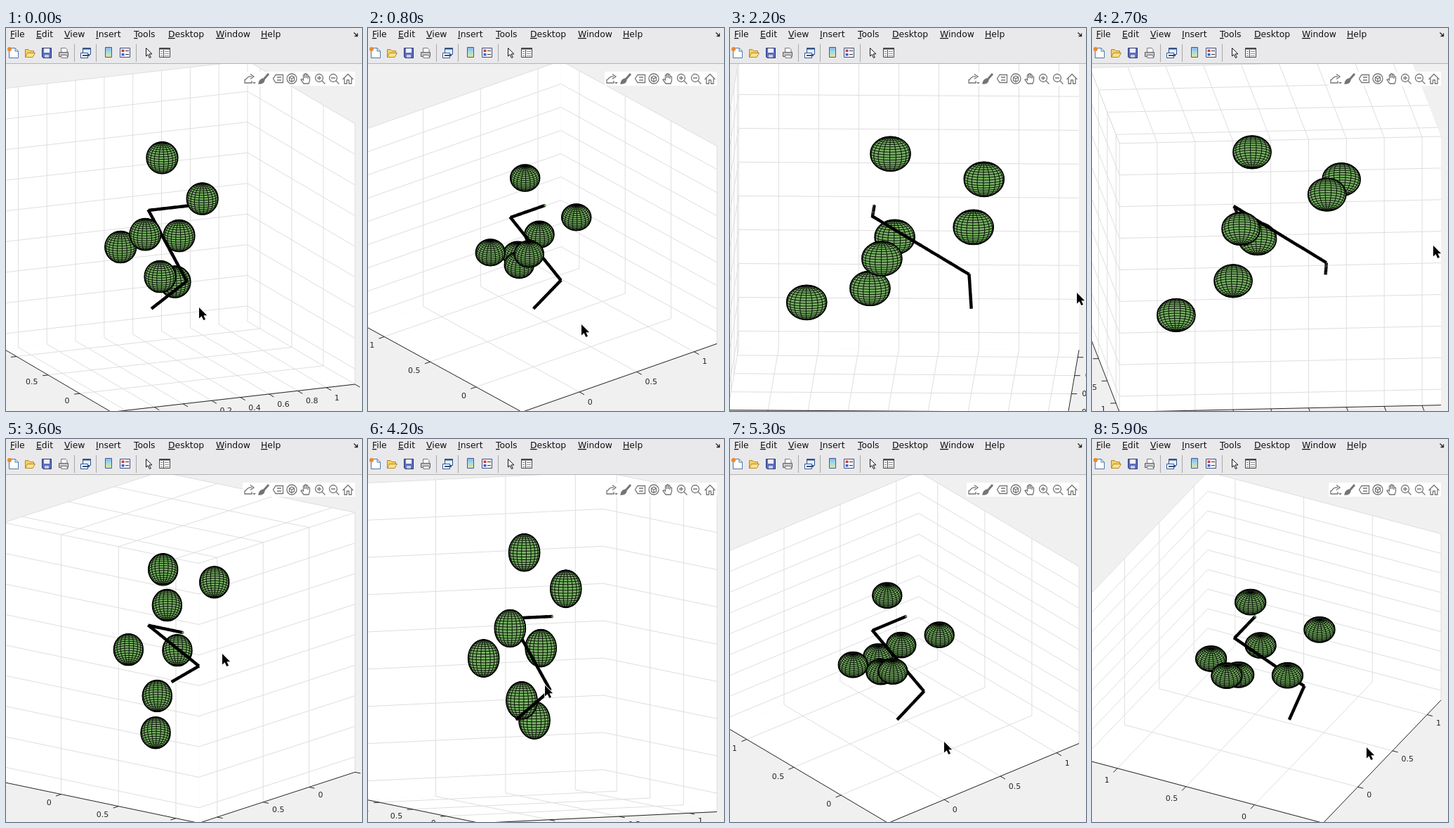
An HTML page with a canvas that plays this animation: 507 px wide and 544 px high, repeating every 6000 ms.

```html
<!DOCTYPE html>
<html lang="en">
<head>
<meta charset="utf-8">
<title>Rotating 3D plot</title>
<style>
html, body { margin: 0; width: 100%; height: 100%; overflow: hidden; background: #f0f0f0; }
canvas, svg { position: absolute; left: 0; top: 0; width: 507px; height: 544px; display: block; }
svg text { font: 12.4px "DejaVu Sans", sans-serif; fill: #111; }
svg tspan { text-decoration: underline; }
</style>
</head>
<body>
<canvas id="plot" width="507" height="544"></canvas>
<svg viewBox="0 0 507 544">
  <rect width="507" height="51" fill="#e9e9eb"/>
  <path d="M0 50.5H507" stroke="#b4b4b4"/>
  <g>
    <text x="6" y="13"><tspan>F</tspan>ile</text><text x="43" y="13"><tspan>E</tspan>dit</text>
    <text x="83" y="13"><tspan>V</tspan>iew</text><text x="128" y="13"><tspan>I</tspan>nsert</text>
    <text x="182" y="13"><tspan>T</tspan>ools</text><text x="231" y="13"><tspan>D</tspan>esktop</text>
    <text x="299" y="13"><tspan>W</tspan>indow</text><text x="363" y="13"><tspan>H</tspan>elp</text>
  </g>
  <path d="M495.500 6.500L500 11M500.500 7.500V11.500H496.500" fill="none" stroke="#222" stroke-width="1.300"/>
  <path d="M97.500 23V48M128.500 23V48M185.500 23V48" stroke="#a8a8a8"/>
  <g stroke-width="1">
    <path d="M4.500 28.500H13L17.500 33V42.500H4.500Z" fill="#fff" stroke="#4a76a8"/>
    <path d="M13 28.500V33H17.500" fill="none" stroke="#4a76a8"/>
    <circle cx="5" cy="30" r="3" fill="#e88a32"/>
    <path d="M27.500 41.500V30.500H32L34 32.500H39.500V35" fill="#f4cf62" stroke="#b8862a"/>
    <path d="M27.500 41.500L30.500 35.500H41.500L38 41.500Z" fill="#fbe28a" stroke="#b8862a"/>
    <path d="M51.500 28.500H64.500V42.500H53L51.500 41Z" fill="#5c6fc0" stroke="#2c3670"/>
    <path d="M54 29H62V35H54Z" fill="#eef0fa"/><path d="M55 38H61V42H55Z" fill="#c8cce0"/>
    <path d="M78.500 34V28.500H85L87 30.500V34" fill="#fff" stroke="#777"/>
    <path d="M75.500 34.500H88.500V40.500H75.500Z" fill="#c4c4c8" stroke="#5c5c60"/>
    <path d="M78.500 38.500H86L88 42.500H79Z" fill="#fff" stroke="#777"/>
    <path d="M109.500 28.500H120.500V37.500H109.500Z" fill="#e6eefa" stroke="#2f528c"/>
    <path d="M109 29.500H121" stroke="#2f528c" stroke-width="2"/>
    <path d="M106.500 35.500H116.500V42.500H106.500Z" fill="#fff" stroke="#2f528c"/>
    <path d="M109 39H119" stroke="#2f528c" stroke-width="2"/>
    <path d="M141.500 27.500H150.500V41.500H141.500Z" fill="url(#bar)" stroke="#3d5c9c"/>
    <path d="M162.500 28.500H176.500V41.500H162.500Z" fill="#fff" stroke="#3a4a80"/>
    <path d="M164.500 30.500H168.500V34H164.500Z" fill="#d04038"/><path d="M164.500 36H168.500V39.500H164.500Z" fill="#3f60cc"/>
    <path d="M170 32.500H175M170 37.500H175" stroke="#333"/>
    <path d="M199.500 28.500V40L202.200 37.600L204.500 42.500L206.300 41.700L204 36.900H208Z" fill="#fff" stroke="#111"/>
    <path d="M218.500 28.500H233.500V41.500H218.500Z" fill="#fff" stroke="#444"/>
    <path d="M218 29.500H234" stroke="#444" stroke-width="2"/>
    <path d="M224.500 31V41" stroke="#444"/>
    <path d="M220 33.500H223M220 36.500H223M220 39.500H223M226 33.500H232M226 36.500H232M226 39.500H232" stroke="#888"/>
  </g>
  <defs>
    <linearGradient id="bar" x2="0" y2="1">
      <stop stop-color="#8fb0f0"/><stop offset=".5" stop-color="#9fe0e0"/><stop offset="1" stop-color="#f2e08a"/>
    </linearGradient>
  </defs>
  <rect x="337" y="62" width="160" height="20" fill="#fff"/>
  <g fill="none" stroke="#757575" stroke-width="1.300">
    <path d="M340 73V78H350V75M341 74Q344 68 350 69M348 65.500L353 69L348 72.500"/>
    <path d="M351 77H356L353.500 79.500Z" fill="#757575" stroke="none"/>
    <path d="M374 65L367 73" stroke-width="3"/><path d="M366 72Q361 73 360 79Q367 79 368 74Z" fill="#757575"/>
    <path d="M384 66.500H394.500V77.500H384L380.500 72ZM386 70H392M386 74H392"/>
    <circle cx="407" cy="72" r="7"/><path d="M403.500 70L407 68L410.500 70V74.500L407 76.500L403.500 74.500ZM403.500 70L407 72L410.500 70M407 72V76.500"/>
    <path d="M424 79L420 73.500Q421 71.500 423.500 74V67Q424.500 65.500 425.500 67V71V65.500Q426.700 64 427.800 65.500V71V66Q429 65 430 66.500V72V69Q431.500 68 432.500 69.500V75L431 79Z"/>
    <circle cx="446" cy="71" r="5.500"/><path d="M443 71H449M446 68V74M450 75L454.500 79.500"/>
    <circle cx="466" cy="71" r="5.500"/><path d="M463 71H469M470 75L474.500 79.500"/>
    <path d="M479.500 73L487 65.500L494.500 73M482 71.500V79H485.500V74H488.500V79H492V71.500"/>
  </g>
  <path id="cursor" d="M0 0V15.500L3.600 12.200L6.300 18L9 16.800L6.400 11.200H11.200Z" fill="#000" stroke="#fff" stroke-width="1.600" paint-order="stroke"/>
</svg>
<script>
const ctx = document.getElementById("plot").getContext("2d");
const cursor = document.getElementById("cursor");
const LOOP = 6000, STEP = 100;
const MIN = -0.5, MAX = 1.2, SPAN = MAX - MIN, MID = (MIN + MAX) / 2;
const BOX = { cx: 247, cy: 296, w: 500, h: 499 };

// time, azimuth, elevation, pointer x, pointer y
const KEYS = [
  [0, -23.8, 14.8, 275, 397],
  [200, -23.8, 14.8, 262, 384],
  [300, -23.8, 14.8, 262, 384],
  [900, -42, 31.5, 314, 427],
  [1400, -60.8, 40.6, 379, 444],
  [1800, -77, 29, 446, 419],
  [2200, -88.2, 12.2, 494, 376],
  [2700, -84.75, -15.8, 486, 309],
  [3150, -63, -21, 402, 285],
  [3600, -38.7, -14.1, 308, 305],
  [4150, -26.5, 3, 256, 346],
  [4700, -20, 22.25, 233, 394],
  [5300, -40, 35, 305, 430],
  [5900, -63.2, 39.6, 391, 438]
];
const BALLS = [
  [.257, .412, .858], [.332, -.053, .695], [-.048, -.012, .493], [.367, .394, .342],
  [-.018, .446, .297], [.288, .515, .055], [.534, .839, -.084]
];
const ARM = [[0, 0, 0], [.255, .019, .148], [.2, .5, .5], [.5, .5, .5]];
const RADIUS = .1, PIECES = 16;

function slope(i, c) {
  const a = KEYS[Math.max(i - 1, 0)], b = KEYS[Math.min(i + 1, KEYS.length - 1)];
  return (b[c] - a[c]) / (b[0] - a[0]);
}

function sample(t) {
  let i = 0;
  while (i < KEYS.length - 2 && t >= KEYS[i + 1][0]) i++;
  const a = KEYS[i], b = KEYS[i + 1], h = b[0] - a[0], s = (t - a[0]) / h;
  const s2 = s * s, s3 = s2 * s;
  return [1, 2, 3, 4].map(c =>
    a[c] * (2 * s3 - 3 * s2 + 1) + b[c] * (3 * s2 - 2 * s3) +
    h * (slope(i, c) * (s3 - 2 * s2 + s) + slope(i + 1, c) * (s3 - s2)));
}

// Orthographic camera whose projected cube always fills the axes box
function makeView(az, el) {
  const rad = Math.PI / 180;
  const ca = Math.cos(az * rad), sa = Math.sin(az * rad);
  const ce = Math.cos(el * rad), se = Math.sin(el * rad);
  const wide = Math.abs(ca) + Math.abs(sa);
  const kx = BOX.w / wide, ky = BOX.h / (Math.abs(se) * wide + ce);
  const turn = (u, v, w) => [
    kx * (ca * u + sa * v),
    -ky * (se * (ca * v - sa * u) + ce * w),
    ce * (sa * u - ca * v) + se * w
  ];
  const project = ([x, y, z]) => {
    const p = turn((x - MID) / SPAN, (y - MID) / SPAN, (z - MID) / SPAN);
    return [BOX.cx + p[0], BOX.cy + p[1], p[2]];
  };
  return { ca, sa, se, kx, ky, turn, project };
}

function ticks(step) {
  const out = [];
  for (let i = Math.ceil(MIN / step - 1e-6); i * step <= MAX + 1e-6; i++) out.push(i * step);
  return out;
}

function trace(view, points) {
  points.forEach((p, i) => {
    const [x, y] = view.project(p);
    i ? ctx.lineTo(x, y) : ctx.moveTo(x, y);
  });
}

function drawWalls(view, far, steps) {
  const zBack = view.se > 0 ? MIN : MAX;
  const [fx, fy] = far;
  const faces = [
    [[fx, MIN, MIN], [fx, MAX, MIN], [fx, MAX, MAX], [fx, MIN, MAX]],
    [[MIN, fy, MIN], [MAX, fy, MIN], [MAX, fy, MAX], [MIN, fy, MAX]],
    [[MIN, MIN, zBack], [MAX, MIN, zBack], [MAX, MAX, zBack], [MIN, MAX, zBack]]
  ];
  ctx.fillStyle = "#fff";
  for (const f of faces) {
    ctx.beginPath();
    trace(view, f);
    ctx.fill();
  }
  ctx.strokeStyle = "#dedede";
  ctx.lineWidth = 1;
  ctx.beginPath();
  for (const x of ticks(steps[0])) {
    trace(view, [[x, fy, MIN], [x, fy, MAX]]);
    trace(view, [[x, MIN, zBack], [x, MAX, zBack]]);
  }
  for (const y of ticks(steps[1])) {
    trace(view, [[fx, y, MIN], [fx, y, MAX]]);
    trace(view, [[MIN, y, zBack], [MAX, y, zBack]]);
  }
  for (const z of ticks(.2)) {
    trace(view, [[fx, MIN, z], [fx, MAX, z]]);
    trace(view, [[MIN, fy, z], [MAX, fy, z]]);
  }
  ctx.stroke();
}

function drawRuler(view, axis, fixed, step) {
  const at = (v, f = fixed) => view.project(axis ? [f, v, MIN] : [v, f, MIN]);
  const a = at(MIN), b = at(MAX), inner = at(MIN, MIN + MAX - fixed);
  const dx = a[0] - inner[0], dy = a[1] - inner[1], len = Math.hypot(dx, dy) || 1;
  const ux = dx / len, uy = dy / len, side = Math.sign(ux);
  const steep = Math.abs(b[1] - a[1]) > 4 * Math.abs(b[0] - a[0]);
  const gap = side > 0 ? 3 : 4.5;
  ctx.strokeStyle = ctx.fillStyle = "#262626";
  ctx.lineWidth = 1;
  ctx.textAlign = side > 0 ? "left" : "right";
  ctx.beginPath();
  ctx.moveTo(a[0], a[1]);
  ctx.lineTo(b[0], b[1]);
  for (const v of ticks(step)) {
    const [x, y] = at(v);
    ctx.moveTo(x, y);
    ctx.lineTo(x + 8 * ux, y + 8 * uy);
    const ox = steep ? 15 : gap + 10 * Math.abs(ux), oy = steep ? 1 : 9.5 + 11 * uy;
    ctx.fillText(String(Math.round(v * 10) / 10), x + side * ox, y + oy);
  }
  ctx.stroke();
}

function drawBall(view, x, y) {
  const r = RADIUS / SPAN, n = 20;
  const vertex = (i, j) => {
    const lon = i * 2 * Math.PI / n, lat = (j / n - .5) * Math.PI;
    return view.turn(r * Math.cos(lat) * Math.cos(lon), r * Math.cos(lat) * Math.sin(lon), r * Math.sin(lat));
  };
  const edge = (p, q) => {
    if (p[2] + q[2] < 0) return;
    ctx.moveTo(x + p[0], y + p[1]);
    ctx.lineTo(x + q[0], y + q[1]);
  };
  ctx.beginPath();
  ctx.ellipse(x, y, r * view.kx, r * view.ky, 0, 0, 2 * Math.PI);
  ctx.fillStyle = "#77b463";
  ctx.fill();
  ctx.strokeStyle = "#000";
  ctx.lineWidth = 1.6;
  ctx.stroke();
  ctx.lineWidth = .9;
  ctx.beginPath();
  for (let i = 0; i < n; i++) {
    for (let j = 0; j < n; j++) {
      const p = vertex(i, j);
      edge(p, vertex(i, j + 1));
      if (j) edge(p, vertex(i + 1, j));
    }
  }
  ctx.stroke();
}

function drawRod(p, q) {
  ctx.strokeStyle = "#000";
  ctx.lineWidth = 4.4;
  ctx.beginPath();
  ctx.moveTo(p[0], p[1]);
  ctx.lineTo(q[0], q[1]);
  ctx.stroke();
}

function drawScene(view) {
  const items = BALLS.map(b => {
    const [x, y, z] = view.project(b);
    return { z, draw: () => drawBall(view, x, y) };
  });
  const mix = (a, b, s) => a.map((v, i) => v + (b[i] - v) * s);
  for (let k = 0; k < ARM.length - 1; k++) {
    for (let i = 0; i < PIECES; i++) {
      const p = view.project(mix(ARM[k], ARM[k + 1], i / PIECES));
      const q = view.project(mix(ARM[k], ARM[k + 1], (i + 1.15) / PIECES));
      items.push({ z: (p[2] + q[2]) / 2, draw: () => drawRod(p, q) });
    }
  }
  const tip = view.project(ARM[ARM.length - 1]);
  items.push({
    z: tip[2] + .004,
    draw() {
      ctx.fillStyle = "#5f9050";
      ctx.beginPath();
      ctx.arc(tip[0], tip[1], 1.7, 0, 2 * Math.PI);
      ctx.fill();
    }
  });
  items.sort((a, b) => a.z - b.z).forEach(item => item.draw());
}

function render(t) {
  const [az, el, mx, my] = sample(t);
  const view = makeView(az, el);
  const far = [view.sa < 0 ? MAX : MIN, view.ca > 0 ? MAX : MIN];
  const low = far.map(f => view.se > 0 ? MIN + MAX - f : f);
  const steps = [view.ca, view.sa].map(c => view.kx * Math.abs(c) > 339 ? .2 : .5);
  ctx.fillStyle = "#f0f0f0";
  ctx.fillRect(0, 0, 507, 544);
  ctx.font = '11px "DejaVu Sans", sans-serif';
  ctx.textBaseline = "middle";
  drawWalls(view, far, steps);
  drawRuler(view, 0, low[1], steps[0]);
  drawRuler(view, 1, low[0], steps[1]);
  drawScene(view);
  cursor.setAttribute("transform", `translate(${Math.round(mx)} ${Math.round(my)})`);
}

const start = performance.now();
function tick() {
  const t = (performance.now() - start) % LOOP;
  render(Math.floor(t / STEP) * STEP);
  requestAnimationFrame(tick);
}
tick();
</script>
</body>
</html>
```
